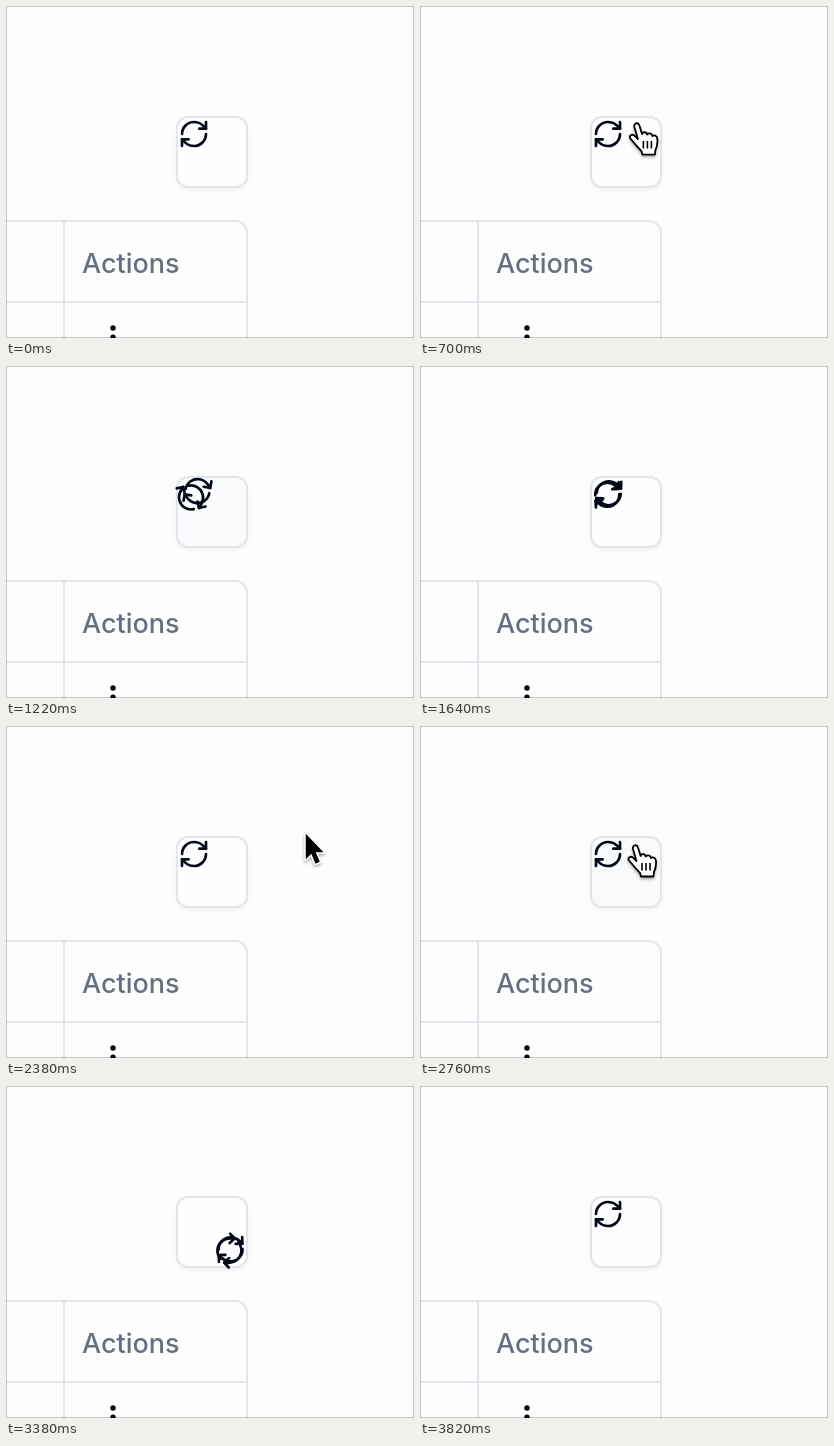
An HTML page for the animation above (5.92 s loop, 408 by 332 pixels).

```html
<!DOCTYPE html>
<html lang="en">
<head>
<meta charset="utf-8">
<title>Refresh button</title>
<style>
  html, body { margin: 0; width: 100%; height: 100%; overflow: hidden; background: #fdfdfd; }
  svg { display: block; width: 408px; height: 332px; }
  .line { fill: none; stroke: #e1e5ec; stroke-width: 2; }
  .icon { fill: none; stroke: #020817; stroke-width: 2; stroke-linecap: round; stroke-linejoin: round; }
  .label { font: 500 27px Inter, sans-serif; fill: #667083; }
  #button { filter: drop-shadow(0 2px 2px rgba(0, 0, 0, .05)); }
  #arrow, #hand { filter: drop-shadow(0 2px 1.5px rgba(0, 0, 0, .3)); }
</style>
</head>
<body>
<svg viewBox="0 0 408 332">
  <defs>
    <g id="refresh" class="icon" transform="translate(172 112) scale(1.3333)">
      <path d="M3 12a9 9 0 0 1 9-9 9.75 9.75 0 0 1 6.74 2.74L21 8"/>
      <path d="M21 3v5h-5"/>
      <path d="M21 12a9 9 0 0 1-9 9 9.75 9.75 0 0 1-6.74-2.74L3 16"/>
      <path d="M8 16H3v5"/>
    </g>
  </defs>

  <rect width="408" height="332" fill="#fdfdfd"/>

  <path class="line" d="M0 215H229a12 12 0 0 1 12 12V332M58 215V332M0 296H241"/>
  <text class="label" x="76" y="267">Actions</text>
  <g fill="#020817">
    <circle cx="107" cy="322" r="2.7"/>
    <circle cx="107" cy="331.3" r="2.7"/>
  </g>

  <rect id="button" class="line" x="171" y="111" width="70" height="70" rx="11"/>
  <use id="ccw" href="#refresh"/>
  <use id="cw" href="#refresh"/>

  <rect x=".5" y=".5" width="407" height="331" fill="none" stroke="#000" stroke-opacity=".22"/>

  <g id="arrow">
    <path d="M0 0V25.5L5.6 20.2L9.6 30L14 28.1L10 18.6H17.8Z"
          fill="#000" stroke="#fff" stroke-width="3" stroke-linejoin="round" paint-order="stroke"/>
  </g>
  <g id="hand">
    <path transform="translate(-8 -2)" fill="#fff" stroke="#000" stroke-width="1.8" stroke-linejoin="round"
          d="M9.5 18L6 6C5 2 10 .8 11 4.5L13.6 13C14 10.6 18.2 10.4 18.8 13.5C20 11.6 23.4 12 24 15
             C25.5 13.6 28.6 14.4 28.9 17.5C29.4 22 29 25 27 29L26.5 33.5H14L13 30C9 26 6 22 2 17.5
             C.2 14.6 3.6 12.6 6 14.6Z"/>
    <path d="M7 18v7.5M11 18v7.5M15 18v7.5" fill="none" stroke="#000" stroke-width="1.6"/>
  </g>
</svg>

<script>
  const LOOP = 5920, STEP = 20, SPIN = 890, TURN = 720;
  const PRESS = [215, 119], EXIT = [242, 240];
  const el = id => document.getElementById(id);
  const clamp = v => Math.min(1, Math.max(0, v));
  const lerp = (a, b, p) => a + (b - a) * p;
  const between = (a, b, p) => a.map((v, i) => lerp(v, b[i], p));

  // Each visit: the pointer follows its route, rests, presses the button and leaves.
  const visits = [
    { enter: 300, arrive: 500, spin: 783, route: [[214, 328], [238, 120], [243, 80]] },
    { enter: 2080, arrive: 2520, spin: 2785, route: [[264, 324], [354, 78], [302, 107], [257, 108]] }
  ];

  // Catmull-Rom curve through evenly timed points
  function along(points, p) {
    const last = points.length - 1;
    const i = Math.min(last - 1, Math.floor(p * last)), u = p * last - i;
    const at = k => points[Math.min(last, Math.max(0, k))];
    const [a, b, c, d] = [at(i - 1), at(i), at(i + 1), at(i + 2)];
    return b.map((v, k) => v + u / 2 * (c[k] - a[k]
      + u * (2 * a[k] - 5 * v + 4 * c[k] - d[k] + u * (3 * (v - c[k]) + d[k] - a[k]))));
  }

  const easeInOut = p => (1 - Math.cos(Math.PI * p)) / 2;

  function pointer({ enter, arrive, spin, route }, t) {
    const since = t - spin;
    if (t < enter || since > 220) return null;
    if (since > 180) return between(PRESS, EXIT, clamp((since - 180) / 20));
    if (since > -140) return between(route[route.length - 1], PRESS, clamp((since + 140) / 60));
    return along(route, clamp((t - enter) / (arrive - enter)));
  }

  function place(node, pos) {
    node.style.display = pos ? '' : 'none';
    if (pos) node.setAttribute('transform', `translate(${pos})`);
  }

  function draw(t) {
    const visit = visits.findLast(v => t >= v.enter) || visits[0];
    const since = t - visit.spin;

    // Two icons circle the button in opposite directions; one also turns on itself.
    const angle = TURN * easeInOut(clamp(since / SPIN));
    el('cw').setAttribute('transform', `rotate(${angle} 206 146) rotate(${angle / 4} 188 128)`);
    el('ccw').setAttribute('transform', `rotate(${-angle} 206 146)`);
    el('ccw').style.display = angle % TURN ? '' : 'none';

    const hover = clamp((since + 80) / 140) * clamp((520 - since) / 230);
    const fill = between([254, 254, 254], [241, 245, 249], hover).map(Math.round);
    el('button').style.fill = `rgb(${fill})`;

    const pos = pointer(visit, t);
    const over = pos && Math.hypot(pos[0] - 206, pos[1] - 146) < 36;
    place(el('arrow'), !over && pos);
    place(el('hand'), over && pos);
  }

  const begin = performance.now();
  function tick() {
    const t = (performance.now() - begin) % LOOP;
    draw(Math.floor(t / STEP) * STEP);
    requestAnimationFrame(tick);
  }
  tick();
</script>
</body>
</html>
```
